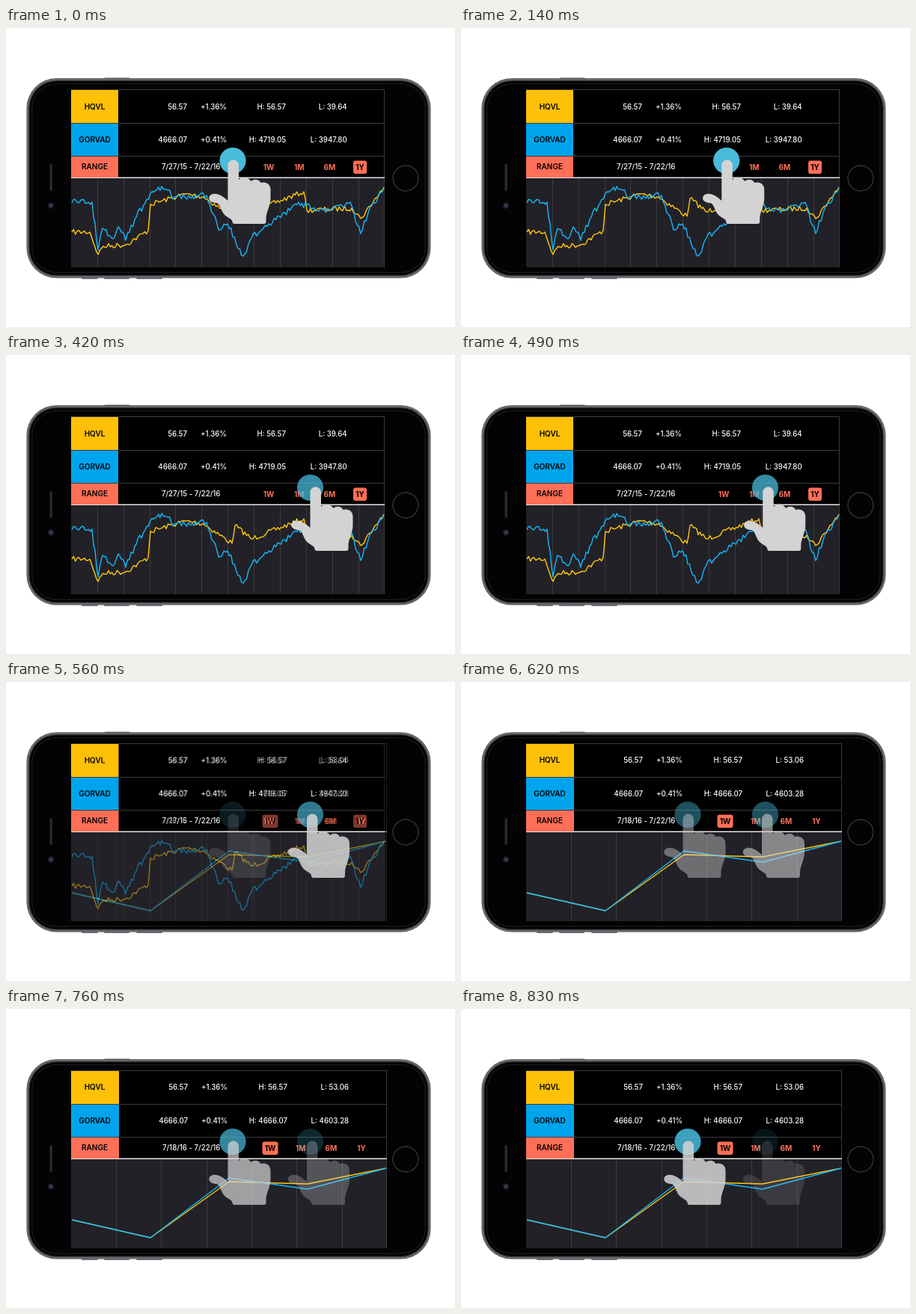
These frames come from a looping animation (600 px wide and 400 px high, 1.16 s). An HTML page with a canvas:

```html
<!DOCTYPE html>
<html lang="en">
<head>
<meta charset="utf-8">
<title>Stock range tap</title>
<style>
html, body { margin: 0; width: 100%; height: 100%; overflow: hidden; background: #fff; }
canvas { display: block; }
</style>
</head>
<body>
<canvas id="stage" width="600" height="400"></canvas>
<script>
const stage = document.getElementById('stage').getContext('2d');
let ctx = stage;

const LOOP = 1160;
const YELLOW = '#ffc107', BLUE = '#00a4ec', RED = '#ff6f57', RULE = '#3c3c3e';

const year = {
  dx: 0, right: 505, rowY: 105, dates: '7/27/15 - 7/22/16',
  highs: ['56.57', '4719.05'], lows: ['39.64', '3947.80'],
  active: 3, grid: [121.7, 34.9],
  yellow: wander('88,273 112,273 123,303 130,292 160,290 190,271 193,236 240,222 ' +
    '264,226 302,252 306,228 328,246 398,219 402,244 462,241 474,255 505,213', 7, 7),
  blue: wander('88,234 115,233 123,297 129,268 143,282 150,266 160,284 172,256 195,219 ' +
    '208,212 225,226 268,224 284,270 296,262 317,305 328,281 391,233 418,245 460,233 ' +
    '474,275 486,241 505,214', 23, 9)
};
const week = {
  dx: 1, right: 508, rowY: 104.5, dates: '7/18/16 - 7/22/16',
  highs: ['56.57', '4666.07'], lows: ['53.06', '4603.28'],
  active: 0, grid: [147, 60.3],
  yellow: daily(282, 306, 231, 234, 213),
  blue: daily(282, 306, 226, 241, 213)
};

function daily(...ys) {
  return ys.map((y, i) => [88 + 105 * i, y]);
}

// Joins key points with a jagged, seeded price line.
function wander(keys, seed, jitter) {
  const points = keys.split(' ').map(pair => pair.split(',').map(Number));
  const out = [points[0]];
  for (let i = 1; i < points.length; i++) {
    const [x0, y0] = points[i - 1], [x1, y1] = points[i];
    const n = Math.ceil((x1 - x0) / 2.4);
    for (let k = 1; k < n; k++) {
      seed = (seed * 16807) % 2147483647;
      const wiggle = (seed / 2147483647 - 0.5) * jitter;
      out.push([x0 + (x1 - x0) * k / n, y0 + (y1 - y0) * k / n + wiggle]);
    }
    out.push(points[i]);
  }
  return out;
}

function rect(x, y, w, h, color) {
  ctx.fillStyle = color;
  ctx.fillRect(x, y, w, h);
}

function round(x, y, w, h, r, color) {
  ctx.fillStyle = color;
  ctx.beginPath();
  ctx.roundRect(x, y, w, h, r);
  ctx.fill();
}

function disc(x, y, r, color) {
  ctx.fillStyle = color;
  ctx.beginPath();
  ctx.arc(x, y, r, 0, Math.PI * 2);
  ctx.fill();
}

function text(str, x, y, align = 'left', color = '#fff', font = '500 9.7px') {
  ctx.font = `${font} Inter, Roboto, sans-serif`;
  ctx.textAlign = align;
  ctx.fillStyle = color;
  ctx.fillText(str, x, y + 3.6);
}

function polyline(points, color) {
  ctx.strokeStyle = color;
  ctx.lineWidth = 1.4;
  ctx.lineJoin = 'round';
  ctx.beginPath();
  for (const [x, y] of points) ctx.lineTo(x, y);
  ctx.stroke();
}

function drawPhone() {
  rect(0, 0, 600, 400, '#fff');
  round(131, 66.5, 35, 5, 1.5, '#76787d');
  for (const [x, w] of [[101, 22], [131, 34], [174, 35]]) round(x, 331, w, 5, 1.5, '#76787d');
  // Metal rim, from the outside in.
  [[0, '#4b4d52'], [1, '#7a7c82'], [2.2, '#3d3e42'], [4, '#000'], [6.5, '#18181a'], [8, '#030303']]
    .forEach(([d, color]) => round(27.5 + d, 67.2 + d, 540 - 2 * d, 267.3 - 2 * d, 40 - d, color));
  round(58.5, 182, 3.5, 36, 1.7, '#29282a');
  disc(60, 237.5, 4.2, '#1d2029');
  disc(60, 237.5, 2, '#34476b');
  disc(534, 201, 17.7, '#343436');
  disc(534, 201, 16.3, '#030303');
}

function drawScreen(s) {
  const width = s.right - 87;
  rect(87, 82, width, 238, '#000');
  for (const y of [82, 127, 171]) rect(87, y, width, 1, RULE);
  rect(87, 201, width, 119, '#222127');
  const [first, gap] = s.grid;
  for (let x = first; x < s.right - 2; x += gap) rect(Math.round(x), 201, 1, 119, RULE);
  rect(s.right, 82, 1, 238, RULE);
  rect(87, 199.5, width + 1, 1.5, '#e6e6e6');

  [['HQVL', YELLOW, 83, 44, s.rowY], ['GORVAD', BLUE, 128, 43, 149], ['RANGE', RED, 172, 28, 185.5]]
    .forEach(([name, color, top, height, y]) => {
      rect(87, top, 63 + s.dx, height, color);
      text(name, 118.5, y, 'center', '#000', '600 10px');
    });
  [s.rowY, 149].forEach((y, i) => {
    text(['56.57', '4666.07'][i], 242 + s.dx, y, 'right');
    text(['+1.36%', '+0.41%'][i], 260 + s.dx, y);
    text('H: ' + s.highs[i], 374 + 2 * s.dx, y, 'right');
    text('L: ' + s.lows[i], 455.7 + 2.5 * s.dx, y, 'right');
  });
  text(s.dates, 208 + s.dx, 185.5);
  ['1W', '1M', '6M', '1Y'].forEach((name, i) => {
    const on = i === s.active, w = i ? 18 : 21;
    const x = 351 + 40.7 * i + 2 * s.dx;
    if (on) round(x - w / 2, 177.5, w, 17.5, 3, RED);
    text(name, x, 186, 'center', on ? '#000' : RED, '700 10px');
  });
  polyline(s.yellow, '#ffc80a');
  polyline(s.blue, '#14b8fb');
}

// Renders once to its own layer, so that layers can cross-fade.
function layer(paint, ...args) {
  const canvas = document.createElement('canvas');
  canvas.width = 600;
  canvas.height = 400;
  ctx = canvas.getContext('2d');
  paint(...args);
  ctx = stage;
  return canvas;
}

// Fingertip at the origin.
const handShape = new Path2D(`M-7 7 C-7-3 7.5-3 7.5 7 V26 C12 21 20 22 24 28
  C29 24 35 26 37 30 C44 28 50 32 50 39 V51 C50 61 44 69 44 78 V82 Q44 85 41 85
  H2 Q-1 85-1 82 C-2 77-9 77-13 71 C-17 65-17 59-22 57 C-34 57-35 47-27 45
  C-19 44-13 49-7 54 Z`);

function hand(x, shift, alpha, spot) {
  ctx.globalAlpha = alpha * spot;
  disc(x, 177.5, 17.6, '#49bbdb');
  ctx.globalAlpha = alpha;
  ctx.save();
  ctx.translate(x + shift, 177);
  ctx.fillStyle = '#d3d3d3';
  ctx.fill(handShape);
  ctx.restore();
  ctx.globalAlpha = 1;
}

// Steps last 70 ms, with two of 30 ms around the screen change and a final hold.
function stepAt(t) {
  if (t < 560) return Math.floor(t / 70);
  if (t < 620) return 8 + Math.floor((t - 560) / 30);
  return Math.min(13, 10 + Math.floor((t - 620) / 70));
}

const clamp = v => Math.min(Math.max(v, 0), 1);
const phone = layer(drawPhone);
const before = layer(drawScreen, year);
const after = layer(drawScreen, week);

function draw(time) {
  const step = stepAt(time);
  const move = clamp(step / 4);
  const nudge = 6.5 * clamp(1 - Math.abs(step - 6) / 2);
  const fade = clamp((step - 7) / 7);
  const swap = clamp((step - 7) / 2);

  ctx.drawImage(phone, 0, 0);
  if (swap < 1) ctx.drawImage(before, 0, 0);
  ctx.globalAlpha = swap;
  ctx.drawImage(after, 0, 0);
  ctx.globalAlpha = 1;
  if (fade > 0) hand(303, 0.5, fade, 1);
  hand(303 + 103.5 * move, fade > 0 ? 2.5 : nudge + 0.5, 1 - fade, move < 1 ? 1 : 0.75);
}

function tick() {
  draw(performance.now() % LOOP);
  requestAnimationFrame(tick);
}
tick();
</script>
</body>
</html>
```
